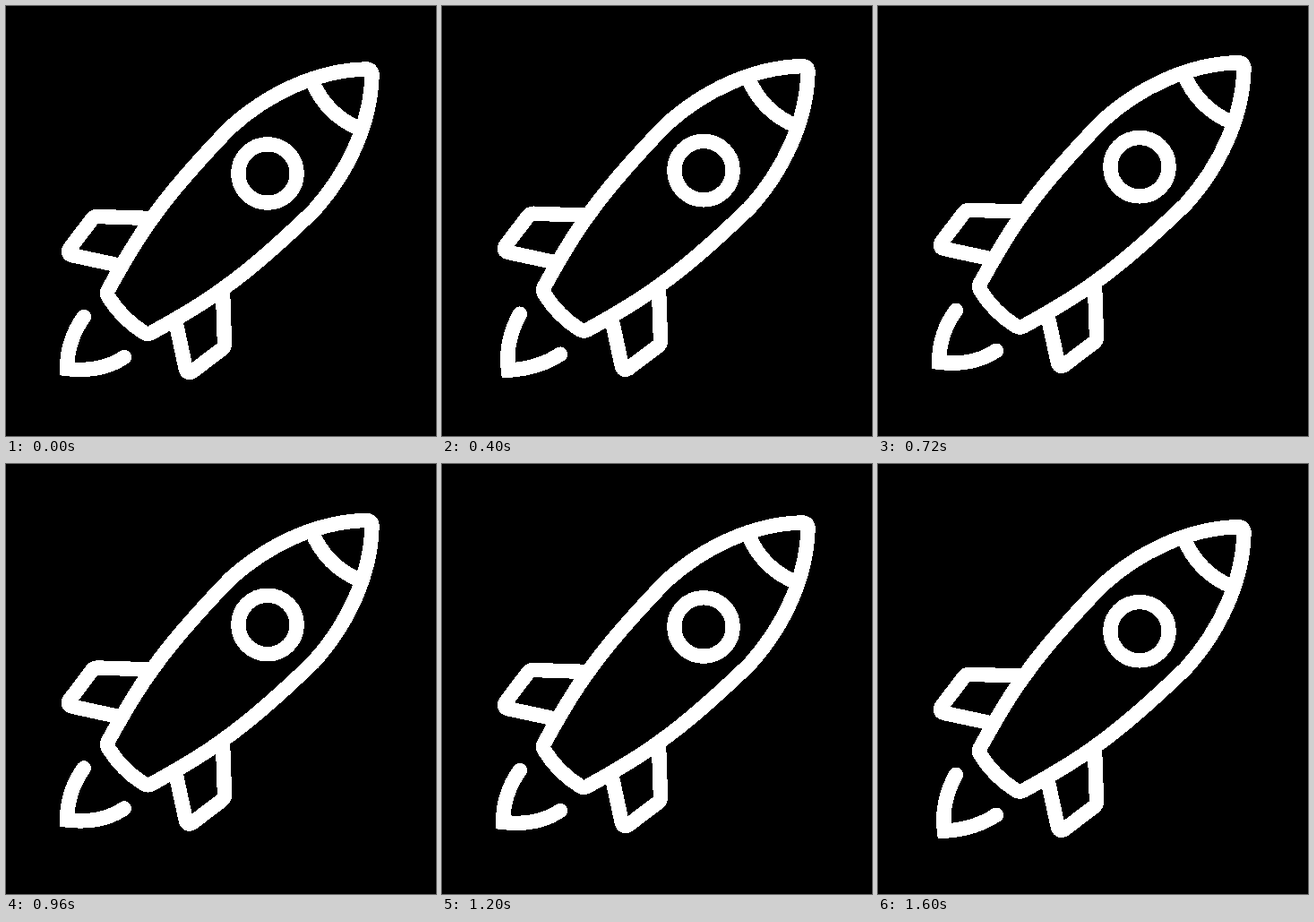
Animation of 480 by 480 pixels, one loop 1680 ms. Source, as an HTML page:

```html
<!DOCTYPE html>
<html lang="en">
<head>
<meta charset="utf-8">
<title>Rocket</title>
<style>
  html, body { margin: 0; height: 100%; overflow: hidden; background: #000; }
  svg { display: block; width: 100vw; height: 100vh; }
</style>
</head>
<body>
<svg viewBox="0 0 480 480" fill="none" stroke="#fff" stroke-width="16.4" stroke-linecap="round" stroke-linejoin="round" shape-rendering="crispEdges">
  <g id="rocket">
    <g id="half">
      <path d="M406.8 72.2Q405 70.3 401 70.5C348 72 293 97 250 136C225 162 187 203 164 236C148 257 130 288 114 317Q112 321 114.5 325"/>
      <path d="M161 237L102 235Q98.5 235 96 238L71 271Q67.5 277 75 278.5L126 289.5"/>
    </g>
    <!-- The hull is symmetric about its diagonal axis -->
    <use href="#half" transform="matrix(0 -1 -1 0 479 479)"/>
    <path d="M114.5 325Q129.7 349.3 154 364.5M341 82Q357 122 397 138"/>
    <circle cx="292" cy="187" r="32.7"/>
    <path id="flame" stroke-linejoin="miter"/>
  </g>
</svg>
<script>
  const LOOP = 1680, STEP = 80, RISE = 7.8, LAG = 20;
  const rocket = document.getElementById('rocket');
  const flame = document.getElementById('flame');
  const flames = [
    'M87 347Q68.5 372 68 405Q106 409.5 132 392',
    'M87 347Q70 378 74 410Q108 408 132 392'
  ];

  function draw(now) {
    const step = Math.floor(now % LOOP / STEP);
    const phase = (step * STEP - LAG) / LOOP * 2 * Math.PI;
    const y = -RISE * (1 - Math.cos(phase)) / 2;
    rocket.setAttribute('transform', `translate(0 ${y.toFixed(3)})`);
    flame.setAttribute('d', flames[step % 3 ? 1 : 0]);
  }

  const start = performance.now();
  function tick() {
    draw(performance.now() - start);
    requestAnimationFrame(tick);
  }
  tick();
</script>
</body>
</html>
```
